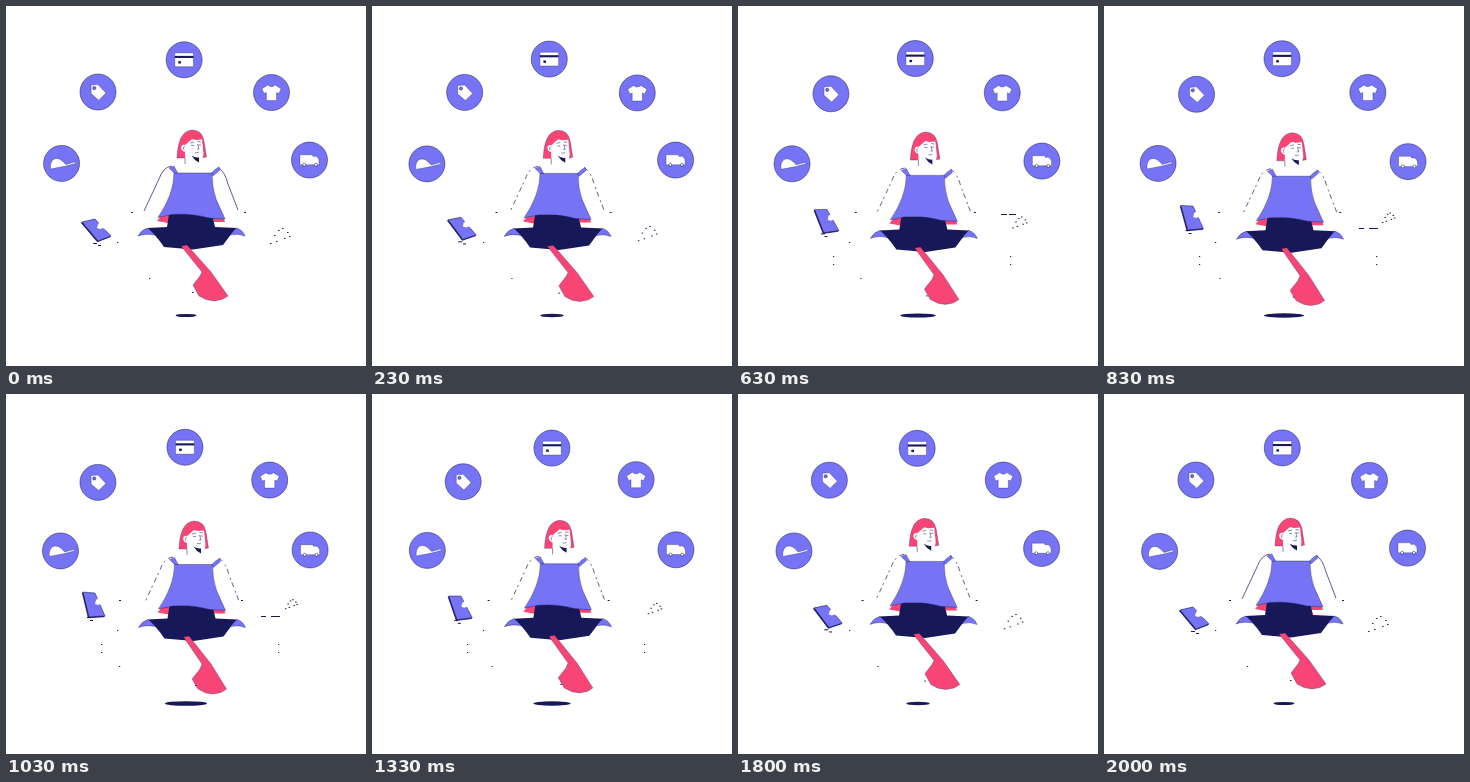
Recreate the animation shown at these times as an HTML page with a canvas. Size 360 px wide and 360 px high, loop 2.03 s.

```html
<!DOCTYPE html>
<html lang="en">
<head>
<meta charset="utf-8">
<title>Floating shopper</title>
<style>
html, body { margin: 0; width: 100%; height: 100%; overflow: hidden; background: #fff; }
canvas { display: block; width: 360px; height: 360px; }
</style>
</head>
<body>
<canvas id="stage"></canvas>
<script>
const LOOP = 2030, TAU = Math.PI * 2;
const LILAC = '#7673f5', PINK = '#f74676', NAVY = '#171858', WHITE = '#fff';
const canvas = document.getElementById('stage');
const ctx = canvas.getContext('2d');
const ratio = window.devicePixelRatio || 1;
canvas.width = canvas.height = 360 * ratio;

function shape(d, fill, stroke, width = 0.6) {
  const path = new Path2D(d);
  if (fill) { ctx.fillStyle = fill; ctx.fill(path); }
  if (stroke) { ctx.strokeStyle = stroke; ctx.lineWidth = width; ctx.stroke(path); }
}

function oval(x, y, rx, ry, fill, stroke) {
  ctx.beginPath();
  ctx.ellipse(x, y, rx, ry, 0, 0, TAU);
  ctx.fillStyle = fill;
  ctx.fill();
  if (stroke) { ctx.strokeStyle = stroke; ctx.lineWidth = 0.5; ctx.stroke(); }
}

function at(x, y, draw, scale = 1) {
  ctx.save();
  ctx.translate(x, y);
  ctx.scale(scale, scale);
  draw();
  ctx.restore();
}

const mark = (x, y, w = 1.2) => { ctx.fillStyle = NAVY; ctx.fillRect(x, y, w, 1); };

// Polygon between two poses
function morph(from, to, p) {
  const mix = from.map((v, i) => (v + (to[i] - v) * p).toFixed(2));
  return 'M' + mix.join(' ') + 'Z';
}

// Each badge: centre x, swing, phase; centre y, swing, phase; icon
const badges = [
  [178.5, 1.5, .71, 53.5, 1, .8, () => {
    shape('M-8.8-6.5H8.8V6.5H-8.8Z', WHITE, NAVY, .3);
    shape('M-8.8-3.7H8.8V-1.7H-8.8Z', NAVY);
    shape('M-5.5 1.3H-3V3.5H-5.5Z', NAVY);
  }],
  [92, 1, .25, 87.2, 1.2, .48, () => {
    shape('M-6.5-6.5L0-7L7.5 1L.7 7.7L-6.5 1.5Z', WHITE, NAVY, .3);
    oval(-3.5, -3.7, 1.5, 1.5, LILAC, NAVY);
  }],
  [264.6, .9, 0, 86.3, .7, .2, () => {
    shape('M-9-3.5L-3.5-7Q0-4 3.5-7L9-3.5L7 1L4.8 0V7.6H-4.8V0L-7 1Z', WHITE, NAVY, .3);
  }],
  [55, 1, .85, 157.2, .8, .2, () => {
    shape('M-10.5 4Q-11-1-7.5-4Q-3-6 1-2L4 1L13-1.5V0L4 2.5L-10.5 5.2Z', WHITE, NAVY, .3);
  }],
  [303.8, .3, .5, 155, 1, .55, () => {
    shape('M-9-5H3V-3.5H6.5Q9 -1.5 9 1V4.5H-9Z', WHITE, NAVY, .3);
    oval(-5, 4.5, 1.4, 1.4, WHITE, NAVY);
    oval(6, 4.5, 1.4, 1.4, WHITE, NAVY);
  }]
];

function drawHead() {
  shape('M179 148H193V160H179Z', WHITE);
  shape('M171 152Q172 125 186 124Q196 124 198 135L200.5 151L195 152H171Z', PINK, NAVY, .3);
  shape('M179 160V146Q174 144 175.5 140Q177 138 179 139L186 133L190 134L196 133.5L197.5 148Q197 154 193 155V160Z', WHITE);
  shape('M185.5 149.5Q189 152 193 151.5V156.5Q188 154 185.5 149.5Z', NAVY);
  shape('M179 152V158M184 137L188 136M191.5 135.5L195 136M185 139.5H188M192 139H195M191.5 138L193 143H191M189 146.5Q191 147.5 193 146M179 140Q176 141 178 144', null, NAVY, .5);
}

function drawArms(p) {
  ctx.setLineDash(p > .08 ? [5, 4, 2, 3] : []);
  shape('M166 160Q157 161 153 173L138 205M212 161Q219 166 222 178L232 204', null, NAVY, .7);
  ctx.setLineDash([]);
}

function drawDress() {
  // hands and seat lining
  shape('M156 209L151 215L162 217L166 209ZM205 209L208 216L219 216L217 210Z', PINK);
  shape('M163 208H206L209 221L231 222Q223 230 217 239L187 243.5L158 241Q150 229 141 222L161 221Z', NAVY);
  shape('M132 230Q136 223 142 222L149 229Q139 227 132 230ZM239 230Q236 223 230 222L224 229Q232 227 239 230Z', LILAC, NAVY, .4);
  // straps and top
  shape('M163 162L168 160L172 167.5H168.5ZM209 163.5L213 161L214 164L207 170L205 167.5Z', LILAC, NAVY, .3);
  shape('M168 167H206Q206 182 210 193L219 213L203 212Q185 207 166 208.5L152 211.5Q168 188 168 167Z', LILAC, NAVY, .4);
}

const legLow = [175, 240, 181, 239, 205, 266, 222, 290, 216, 293.5, 208, 295, 200, 293.5, 193, 290, 187, 279, 194, 270, 196, 266];
const legHigh = [177.5, 243, 183, 242, 205, 270, 220.5, 295, 215, 298.5, 207, 300, 200, 299, 192, 295, 186, 285, 194, 275, 196, 270];
const phoneLow = [76, 216, 89, 213, 105, 230, 92, 235];
const phoneHigh = [77, 198, 89, 199, 99, 222, 83, 223];
const crumbs = [[-10, 7], [-4, 5], [-2, -6], [2, -8], [7, -4], [9, 0], [-6, -1], [4, 2]];

function drawPhone(p) {
  const body = morph(phoneLow, phoneHigh, p);
  at(-.7, .8, () => shape(body, NAVY, NAVY, .7));
  shape(body, LILAC, NAVY, .5);
  // fingers
  at(96 - 2 * p, 221 - 12 * p, () =>
    shape('M-4-3L0-6L5-1L4 3L1 1L-2 2L-5 1Z', WHITE));
  mark(87 - 6 * p, 237 - 14 * p, 4);
  mark(92 - 8 * p, 239 - 13 * p, 3);
}

function drawMarks(u, p) {
  if (p > .2) for (const x of [95, 272]) { mark(x, 250); mark(x, 258); }
  mark(143 - 30 * p, 272);
  mark(125 - 12 * p, 206, 2);
  mark(238 - 3 * p, 206, 2);
  mark(111, 236);
  const spread = 1 - .4 * p;
  for (const [x, y] of crumbs)
    mark(274 + 11 * p + x * spread, 230 - 20 * p + y * spread, 1.5);
  if (p > .8 && u < .6) { mark(255, 222, 5); mark(265, 222, 9); }
  if (u < .5 && p > .55 && p < .8) { mark(263, 208, 6); mark(271, 208, 7); }
}

function draw(now) {
  const u = now % LOOP / LOOP;
  const p = (1 - Math.cos(u * TAU)) / 2;
  const sway = phase => Math.cos((u - phase) * TAU);
  ctx.setTransform(ratio, 0, 0, ratio, 0, 0);
  ctx.fillStyle = WHITE;
  ctx.fillRect(0, 0, 360, 360);

  for (const [x, dx, px, y, dy, py, icon] of badges)
    at(x + dx * sway(px), y + dy * sway(py), () => {
      oval(0, 0, 18, 18, LILAC, NAVY);
      at(0, 0, icon, 1.06);
    });

  oval(180, 309.5, 10.5 + 10.5 * p, 1.6 + .7 * p, NAVY);
  at(p, 3 * p, () => drawArms(p));
  at(.5 * p, 3.5 * p, drawDress);
  shape(morph(legLow, legHigh, p), PINK, NAVY, .3);
  mark(186 + 3 * p, 286 + 5 * p, 1.5);
  at(2 * p, 3 * p, drawHead);
  drawPhone(p);
  drawMarks(u, p);
}

const start = performance.now();
function tick() {
  draw(performance.now() - start);
  requestAnimationFrame(tick);
}
tick();
</script>
</body>
</html>
```
